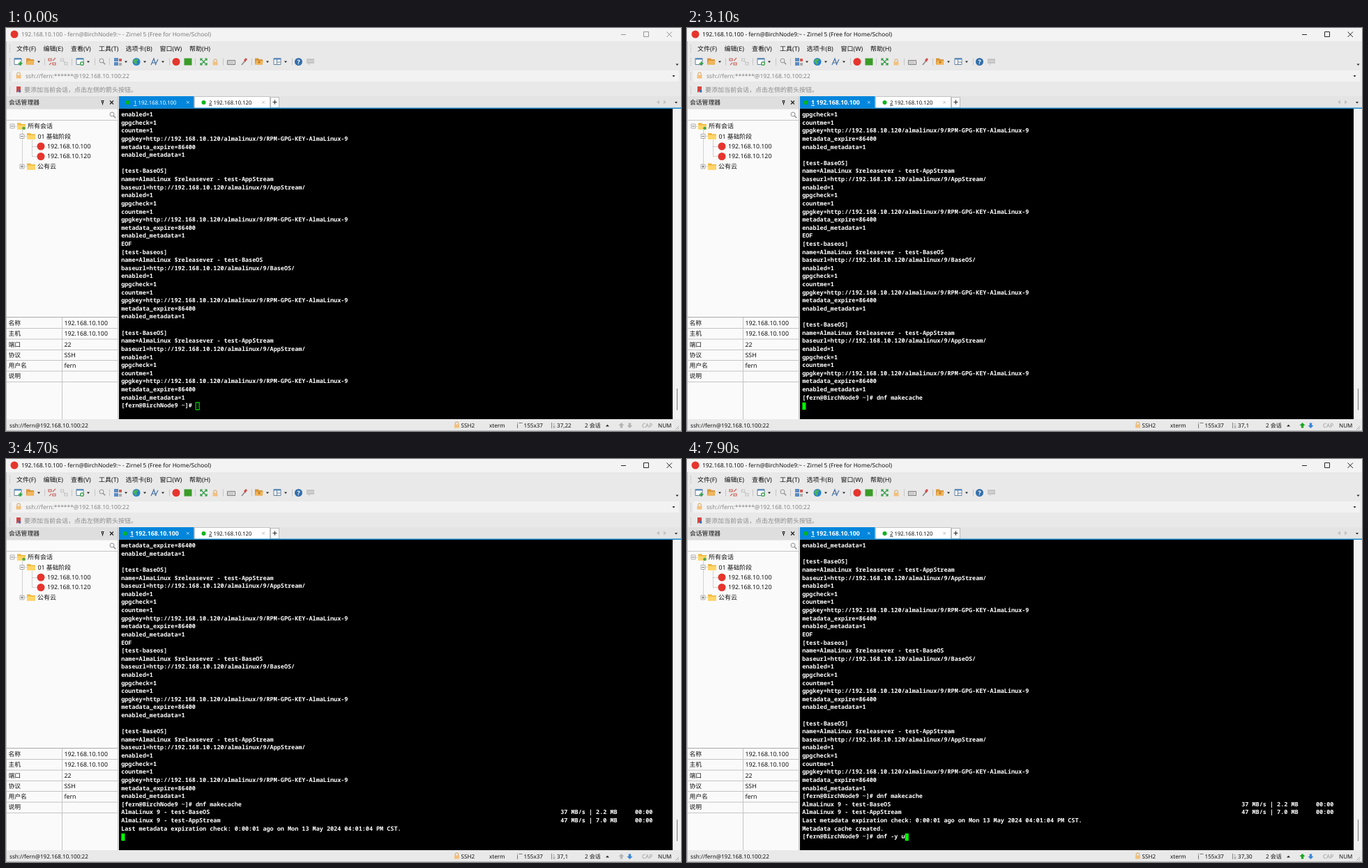
Recreate the animation shown at these times as an HTML page. Size 968x579 px, loop 8000 ms.

```html
<!DOCTYPE html>
<html lang="zh-CN">
<head>
<meta charset="utf-8">
<title>Terminal session</title>
<style>
html, body { margin: 0; width: 100%; height: 100%; overflow: hidden; background: #e9e9e9; }
svg { display: block; width: 968px; height: 579px; }
text { white-space: pre; text-rendering: geometricPrecision; }
.ui { font: 8.8px "Noto Sans", "Noto Sans CJK SC", "Noto Sans CJK", sans-serif; fill: #111; }
.menu { font-size: 9px; }
.title { font-size: 8.35px; }
.small { font-size: 8.1px; }
.tab { font-size: 7.75px; }
.key { text-decoration: underline; }
.term { font: 700 8.47px "Noto Sans Mono", "DejaVu Sans Mono", monospace; fill: #fff; }
.line { fill: none; stroke: #c4c4c4; }
#window .controls { stroke: #111; fill: none; }
#window.idle .controls { stroke: #8c8c8c; }
#window.idle .title { fill: #7d7d7d; }
#window.idle .focused, #window:not(.idle) .unfocused { display: none; }
.focused .bold { font-size: 8.75px; font-weight: 700; }
</style>
</head>
<body>
<svg id="window" class="idle" viewBox="0 0 968 579">
  <defs>
    <path id="caret" d="M-2-1h4l-2 2.4z" fill="#222"/>
    <path id="sep" d="M.5-5v10" stroke="#c6c6c6"/>
    <path id="grip" d="M.5-5v11" stroke="#a8a8a8" stroke-dasharray="1 1.5"/>
    <g id="folder">
      <path d="M-6-4.5h5l1 1.5h6v7.500h-12z" fill="#efb73f"/>
      <path d="M-6-1.500h12v6h-12z" fill="#ffd569"/>
    </g>
    <g id="bin">
      <path d="M-6-4.500h5l1 1.500h5v7.500h-11z" fill="#d9963a"/>
      <path d="M-4-1h10l-2 5.500h-10z" fill="#f0b65c"/>
    </g>
    <g id="lock">
      <path d="M-2.200 0v-2a2.200 2.200 0 0 1 4.400 0v2" fill="none" stroke="#dcb27c" stroke-width="1.200"/>
      <path d="M-3.500-.5h7v5h-7z" fill="#f2c07c"/>
    </g>
    <g id="lens" fill="none" stroke="#909090">
      <circle r="3"/><path d="M2 2l3.200 3.200" stroke-width="1.500"/>
    </g>
    <g id="box">
      <path d="M-3-3h6v6h-6z" fill="#fff" stroke="#9a9a9a" stroke-width=".8"/>
      <path d="M-1.800 0h3.600" stroke="#444" stroke-width=".8"/>
    </g>
    <g id="pane">
      <path d="M-5-4.500h10v9h-10z" fill="#fff" stroke="#66809b"/>
      <path d="M-5-3.500h10" stroke="#5c8fc4" stroke-width="2"/>
    </g>
    <path id="arrow" d="M0-4l4 4h-2.300v3.500h-3.400v-3.500h-2.300z"/>
  </defs>

  <rect width="968" height="579" fill="#e9e9e9"/>
  <rect width="968" height="19" fill="#f3f3f3"/>
  <circle cx="12" cy="9" r="5.500" fill="#e5352d"/>
  <text class="ui title" x="22" y="12">192.168.10.100 - fern@BirchNode9:~ - Zirnel 5 (Free for Home/School)</text>
  <path class="controls" d="M882 9.500h7M914.500 5.500h7v7h-7zM947.500 5.500l7.500 7.500m0-7.500l-7.500 7.500" stroke-width=".9"/>

  <g class="ui menu">
    <text x="15" y="33">文件(F)</text><text x="53.500" y="33">编辑(E)</text>
    <text x="93" y="33">查看(V)</text><text x="133" y="33">工具(T)</text>
    <text x="171.500" y="33">选项卡(B)</text><text x="220.500" y="33">窗口(W)</text>
    <text x="263" y="33">帮助(H)</text>
  </g>

  <g id="toolbar">
    <use href="#pane" x="17" y="48"/><path d="M20.500 48v6m-3-3h6" stroke="#24a43b" stroke-width="1.600"/>
    <use href="#bin" x="35" y="48"/>
    <g fill="none" stroke-width="1.200">
      <g stroke="#c9665f"><path d="M61 44h4v3h-4zM67 50h4v3h-4zM62 53l3-3m2-3l4-4"/></g>
      <g stroke="#c5c5c5"><path d="M78.500 44h4v3.500h-4zM84 49.500h4v3.500h-4zM82 47l3 3"/></g>
    </g>
    <use href="#pane" x="106" y="48"/><circle cx="109" cy="51" r="2.300" fill="#fff" stroke="#4fa85d" stroke-width="1.600"/>
    <use href="#lens" x="137" y="47"/>
    <path d="M155 43h6v5h-6zM155 49h6v5h-6z" fill="#5a8cc2"/><path d="M162 44h4v4h-4z" fill="#d4574b"/><path d="M162 50h4v4h-4z" fill="#aaa"/>
    <circle cx="187" cy="48.500" r="5.500" fill="#2b7fcb"/><path d="M184 45l4-1 2 2-3 2 1 3-2 2-2-3-2-2z" fill="#49b35a"/>
    <path d="M208 53l4-9 3 9m-6-3h5M214 53l4-8" fill="none" stroke="#4772a3" stroke-width="1.200"/>
    <circle cx="244" cy="48.500" r="5.500" fill="#e5352d"/>
    <rect x="255.500" y="43.500" width="11" height="10" fill="#3a9b28"/>
    <path d="M279 47v-3h3m3 0h3v3m0 3v3h-3m-3 0h-3v-3M279 44l9 9m0-9l-9 9" fill="none" stroke="#2f9d43" stroke-width="1.200"/>
    <use href="#lock" x="300" y="49"/>
    <path d="M317.500 46.500h11v6h-11z" fill="#e8e8e8" stroke="#777"/><path d="M319 48.500h8m-8 2h8" stroke="#777" stroke-dasharray="1 1"/>
    <path d="M338 53l5-6" stroke="#888" stroke-width="1.500"/><path d="M341 46l3-3 2 2-3 4z" fill="#d44b47"/>
    <use href="#bin" x="363" y="48"/><path d="M361 49h4m-2-2v4" stroke="#b96c16"/>
    <use href="#pane" x="389" y="48"/><path d="M388.500 45v7m0-3h5" stroke="#66809b"/>
    <circle cx="419.500" cy="48.500" r="5.500" fill="#346fab"/><text class="ui" x="417.500" y="51.500" style="fill:#fff;font-weight:700">?</text>
    <path d="M431 44h11v7h-6l-2 3v-3h-3z" fill="#c6c6c6"/><path d="M433 47.500h7" stroke="#eee" stroke-dasharray="1 1"/>
  </g>

  <rect x="9" y="61" width="956" height="16" fill="#f2f2f2"/>
  <use href="#lock" x="18" y="68"/>
  <text class="ui" x="28" y="72" style="font-size:8.500px;fill:#858585">ssh://fern:******@192.168.10.100:22</text>
  <path d="M15 84h6v9l-3-2-3 2z" fill="#d34541"/><path d="M18 88l4 3-4 2z" fill="#336fb5"/>
  <text class="ui menu" x="26" y="92" style="fill:#8b8b8b">要添加当前会话，点击左侧的箭头按钮。</text>

  <rect y="98" width="160" height="18" fill="#dedede"/>
  <text class="ui" x="4" y="110">会话管理器</text>
  <path d="M136.500 104.500h4m-3 0v3h2v-3m-1 3v3" fill="none" stroke="#222"/>
  <path d="M149 104.500l5 5m0-5l-5 5" stroke="#222" stroke-width="1.200"/>
  <rect x="1" y="117" width="159" height="445" fill="#fafafa"/>
  <use href="#lens" x="152" y="124"/>
  <path class="line" d="M1 132.500h159M160.500 98v464" stroke="#ddd"/>

  <path d="M12 141.500h4M23.500 147v52M23.500 155.500h7m-7 43.500h7M37.500 161v23.500h7m-7-14h7" fill="none" stroke="#aaa" stroke-dasharray="1 1"/>
  <use href="#box" x="9" y="141"/><use href="#box" x="23" y="155.500"/>
  <use href="#box" x="23" y="199"/><path d="M23 197.200v3.600" stroke="#444" stroke-width=".8"/>
  <use href="#folder" x="22" y="141"/><circle cx="25.500" cy="144" r="2.300" fill="#54ab4d"/>
  <use href="#folder" x="36" y="155.500"/><use href="#folder" x="36" y="199"/>
  <g fill="#e5352d"><circle cx="50" cy="170" r="5.500"/><circle cx="50" cy="184.500" r="5.500"/></g>
  <g class="ui">
    <text x="31" y="144" class="menu">所有会话</text><text x="45.500" y="158.500">01 基础阶段</text>
    <text x="59" y="173">192.168.10.100</text><text x="59" y="187">192.168.10.120</text>
    <text x="45" y="202" class="menu">公有云</text>
  </g>

  <path d="M1 415.500h159" stroke="#aaa"/>
  <path class="line" d="M1 431.500h159M1 447h159M1 462.500h159M1 477.500h159M1 493h159M1 508.500h159M80.500 416v146"/>
  <g class="ui">
    <text x="3.500" y="427">名称</text><text x="83.500" y="427">192.168.10.100</text>
    <text x="3.500" y="442.400">主机</text><text x="83.500" y="442.400">192.168.10.100</text>
    <text x="3.500" y="458">端口</text><text x="83.500" y="458">22</text>
    <text x="3.500" y="473">协议</text><text x="83.500" y="473">SSH</text>
    <text x="3.500" y="488.400">用户名</text><text x="83.500" y="488.400">fern</text>
    <text x="3.500" y="503.400">说明</text>
  </g>

  <rect x="161" y="98" width="807" height="17" fill="#e4e4e4"/>
  <rect x="162" y="98" width="107.500" height="18" fill="#0086dc"/>
  <rect x="270.500" y="98.500" width="108" height="17" fill="#fff" stroke="#c3c3c3"/>
  <rect x="379.500" y="99.500" width="12" height="15" fill="#fafafa" stroke="#bbb"/>
  <path d="M382.500 106.500h6m-3-3v6" stroke="#333" stroke-width="1.200"/>
  <path d="M162 115.300h806" stroke="#1a86c7" stroke-width="1.400"/>
  <g fill="#08b51c"><circle class="unfocused" cx="174.500" cy="107" r="3"/><circle class="focused" cx="170.500" cy="107" r="3"/><circle cx="283.500" cy="107" r="3"/></g>
  <g class="ui" style="fill:#fff">
    <g class="unfocused"><text class="tab" x="183" y="110"><tspan class="key">1</tspan> 192.168.10.100</text></g>
    <g class="focused"><text class="bold" x="178" y="110"><tspan class="key">1</tspan> 192.168.10.100</text></g>
  </g>
  <text class="ui tab" x="291" y="110"><tspan class="key">2</tspan> 192.168.10.120</text>
  <path d="M259 105l3.500 3.500m0-3.500l-3.500 3.500" stroke="#b7dcf5"/><path d="M367.500 105l3.500 3.500m0-3.500l-3.500 3.500" stroke="#bbb"/>
  <path d="M937 103.500v6l-4-3zM943 103.500v6l4-3z" fill="#c2c2c2"/>

  <rect x="162" y="116" width="794" height="446" fill="#000"/>
  <rect x="956" y="116" width="12" height="446" fill="#f2f2f2"/>
  <path d="M962.500 518v31" stroke="#858585" stroke-width="1.200"/>
  <g id="screen" class="term"></g>
  <rect id="cursor" y="538" width="5" height="10.500" stroke="#0f0"/>

  <rect y="562" width="968" height="17" fill="#e9e9e9"/>
  <use href="#lock" x="646.500" y="570"/>
  <path d="M733.500 575v-6m2-1.500h5M733 567.500h1" stroke="#777" fill="none"/>
  <path d="M782.500 567v8m2-6h2m-2 3h3m-3 2h3" stroke="#888" fill="none"/>
  <g class="ui small">
    <text x="5" y="574">ssh://fern@192.168.10.100:22</text>
    <text x="652.500" y="574">SSH2</text><text x="693" y="574">xterm</text>
    <text x="742.500" y="574">155x37</text><text id="position" x="790" y="574"></text>
    <text x="830" y="574">2 会话</text><text x="912" y="574" style="fill:#999">CAP</text><text x="935" y="574">NUM</text>
  </g>
  <path d="M860 572.500h5l-2.500-2.800z" fill="#222"/>
  <use id="up" href="#arrow" x="882.500" y="571"/>
  <use id="down" href="#arrow" transform="translate(894.500 571) scale(1 -1)"/>
  <path d="M960 577l5-5m-2 5l2-2" stroke="#aaa"/>
  <path d="M.5 19v560M0 578.500h968" stroke="#b9b9b9" fill="none"/>
</svg>
<script>
const $ = id => document.getElementById(id);
const LOOP = 8000, ROWS = 37, COL_W = 5.082, ROW_H = 11.611, LEFT = 165.2, BASELINE = 127.2;

function addShape(tag, parent, attributes) {
  const el = document.createElementNS("http://www.w3.org/2000/svg", tag);
  for (const name in attributes) el.setAttribute(name, attributes[name]);
  parent.append(el);
  return el;
}

function place(id, points) {
  for (const [x, y] of points) addShape("use", $("window"), { href: "#" + id, x, y });
}
place("caret", [47, 118, 172, 199, 225, 375, 401].map(x => [x, 48.5]));
place("caret", [[962.5, 52.5], [957.5, 69], [961, 107]]);
place("sep", [55, 94, 127, 148, 234, 271, 311, 352, 410].map(x => [x, 48.5]));
place("grip", [29, 48, 69, 89].map(y => [5, y]));

// Terminal history
const HOST = "http://192.168.10.120/almalinux/9/";
const options = ["enabled=1", "gpgcheck=1", "countme=1",
  `gpgkey=${HOST}RPM-GPG-KEY-AlmaLinux-9`, "metadata_expire=86400", "enabled_metadata=1"];
const repo = (id, name) => [`[${id}]`, `name=AlmaLinux $releasever - test-${name}`,
  `baseurl=${HOST}${name}/`, ...options];
const history = [...options, "", ...repo("test-BaseOS", "AppStream"), "EOF",
  ...repo("test-baseos", "BaseOS"), "", ...repo("test-BaseOS", "AppStream")];

const PROMPT = "[fern@BirchNode9 ~]# ";
const label = name => `AlmaLinux 9 - test-${name}`;
const loading = name => label(name).padEnd(104) + "[" + "===".padEnd(17) + "] --- B/s |  0  B     --:-- ETA";
const loaded = (name, rate) => label(name).padEnd(124) + rate + "     00:00";

const typed = cmd => ({ lines: [PROMPT + cmd] });
const command = PROMPT + "dnf makecache";
const base = loaded("BaseOS", "37 MB/s | 2.2 MB");
const apps = loaded("AppStream", "47 MB/s | 7.0 MB");
const check = "Last metadata expiration check: 0:00:01 ago on Mon 13 May 2024 04:01:04 PM CST.";
const output = [command, base, apps, check, "Metadata cache created."];
const retyped = cmd => ({ lines: [...output, PROMPT + cmd] });

// Each step changes only the listed properties.
const steps = [
  [0, { ...typed(""), focus: false, up: false, down: false, home: false }],
  [200, { focus: true }],
  [300, { down: true }],
  [800, { ...typed("d"), up: true }],
  [900, typed("dn")],
  [1000, typed("dnf ")],
  [1100, { up: false }],
  [1300, typed("dnf m")],
  [1400, { up: true }],
  [1500, typed("dnf ma")],
  [1700, { up: false }],
  [2100, { ...typed("dnf make"), up: true }],
  [2300, { ...typed("dnf makec"), up: false }],
  [2400, { ...typed("dnf makeca"), up: true }],
  [2600, typed("dnf makecac")],
  [2800, typed("dnf makecach")],
  [2900, typed("dnf makecache")],
  [3100, { lines: [command, ""] }],
  [3300, { lines: [command, loading("BaseOS")], home: true, up: false }],
  [3400, { lines: [command, base, loading("AppStream")] }],
  [3700, { lines: [command, base, apps] }],
  [3800, { lines: [command, base, apps, ""], home: false }],
  [4700, { lines: [command, base, apps, check, ""] }],
  [4900, { lines: [...output, ""] }],
  [5000, retyped("")],
  [6400, { ...retyped("d"), up: true }],
  [6600, retyped("dn")],
  [6700, retyped("dnf ")],
  [6900, { up: false }],
  [7400, retyped("dnf -")],
  [7700, { ...retyped("dnf -y"), up: true }],
  [7800, retyped("dnf -y ")],
  [7900, retyped("dnf -y u")]
];

const rows = Array.from({ length: ROWS }, (_, i) =>
  addShape("text", $("screen"), { x: LEFT, y: (BASELINE + i * ROW_H).toFixed(2) }));

function draw(state) {
  const visible = [...history, ...state.lines].slice(-ROWS);
  rows.forEach((row, i) => { row.textContent = visible[i]; });
  const col = state.home ? 0 : visible[ROWS - 1].length;
  $("cursor").setAttribute("x", LEFT + col * COL_W + .2);
  $("cursor").setAttribute("fill", state.focus ? "#0f0" : "none");
  $("cursor").setAttribute("stroke-width", state.focus ? 0 : 1);
  $("position").textContent = `${ROWS},${col + 1}`;
  $("window").classList.toggle("idle", !state.focus);
  $("up").setAttribute("fill", state.up ? "#16a51c" : "#b4b4b4");
  $("down").setAttribute("fill", state.down ? "#3985d9" : "#b4b4b4");
}

let shown = 0;
function tick() {
  const time = performance.now() % LOOP;
  const past = steps.filter(([start]) => start <= time);
  if (past.length !== shown) {
    shown = past.length;
    draw(Object.assign({}, ...past.map(([, change]) => change)));
  }
  requestAnimationFrame(tick);
}
tick();
</script>
</body>
</html>
```
